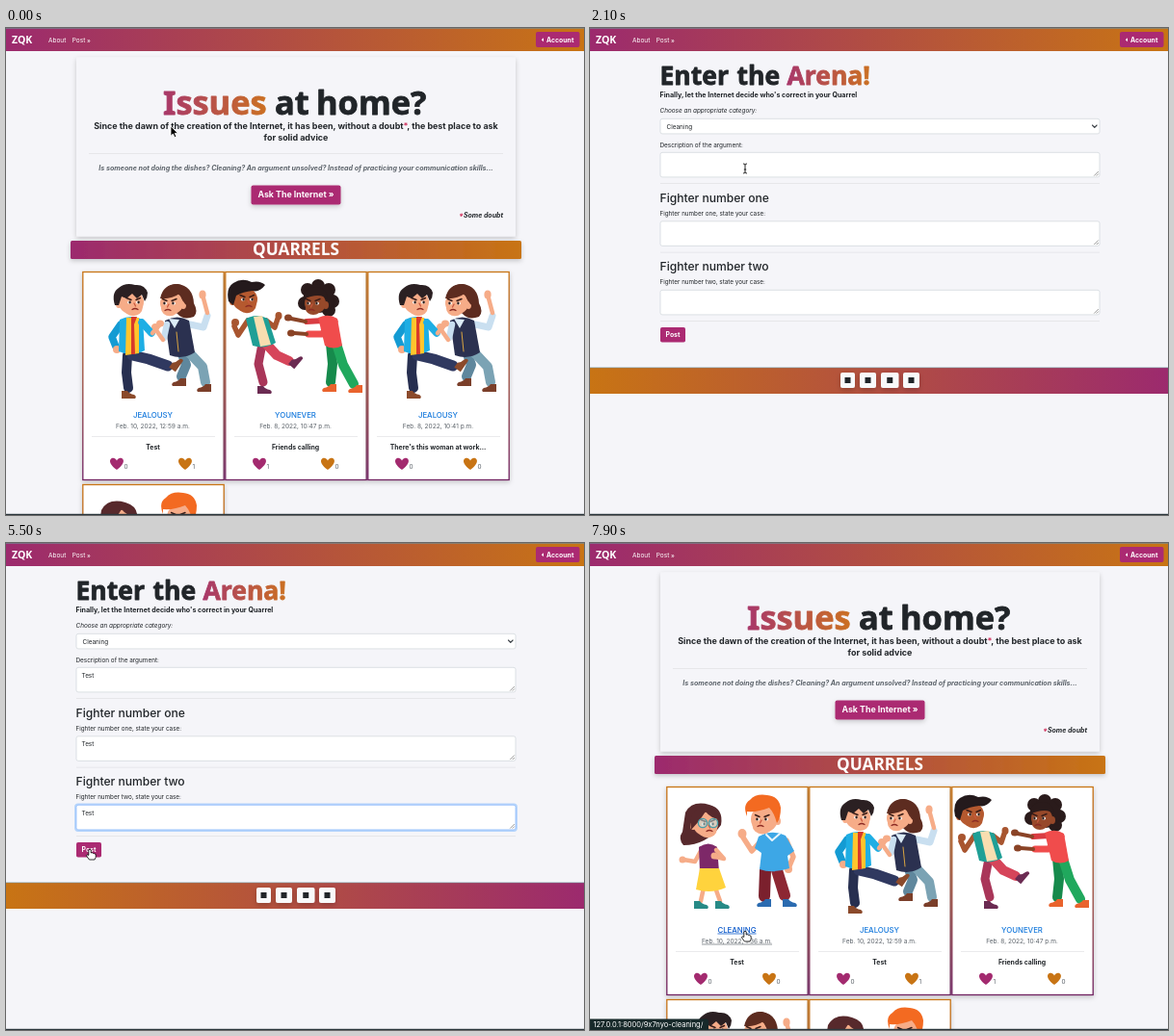
These frames come from a looping animation (600x506 px, 8 s). An HTML page:

```html
<!DOCTYPE html>
<html lang="en">
<head>
<meta charset="utf-8">
<title>Quarrels</title>
<style>
  html, body { margin: 0; width: 100%; height: 100%; overflow: hidden; background: #f5f5f9; }
  svg { display: block; width: 100vw; height: 100vh; font-family: Inter, sans-serif; fill: #212529; }
  text { white-space: pre; }
  .mid { text-anchor: middle; }
  .end { text-anchor: end; }
  .bold { font-weight: 700; }
  .medium { font-weight: 500; }
  .italic { font-style: italic; }
  .light { fill: #fff; }
  .muted { fill: #5c636a; }
  .blue { fill: #1478dc; }
  .display { font-family: "Noto Sans", sans-serif; font-weight: 700; stroke-linejoin: round; }
  .hover .card:first-child .link { text-decoration: underline; }
  .hover .card:first-child .blue { fill: #0a58ca; }
</style>
</head>
<body>
<svg id="stage" viewBox="0 0 600 506" preserveAspectRatio="none"></svg>
<script>
const PLUM = '#a32a6f', AMBER = '#c87414', INK = '#212529', SKIN = '#f6ac88';
const stage = document.getElementById('stage');

// Drawing helpers
const text = (x, y, size, str, cls = '', extra = '') =>
  `<text x="${x}" y="${y}" font-size="${size}" class="${cls}" ${extra}>${str}</text>`;
const rect = (x, y, w, h, fill, extra = '') =>
  `<rect x="${x}" y="${y}" width="${w}" height="${h}" fill="${fill}" ${extra}/>`;
const oval = (x, y, rx, ry, fill) => `<ellipse cx="${x}" cy="${y}" rx="${rx}" ry="${ry}" fill="${fill}"/>`;
const shape = (d, fill) => `<path d="M${d}Z" fill="${fill}"/>`;
const limb = (d, width, color) =>
  `<path d="M${d}" fill="none" stroke="${color}" stroke-width="${width}" stroke-linecap="round" stroke-linejoin="round"/>`;
const rule = (x1, x2, y) => rect(x1, y, x2 - x1, .6, '#dcdce0');
const title = (x, y, size, str, fill) =>
  text(x, y, size, str, 'display', `fill="${fill}" stroke="${fill}" stroke-width=".8"`);

const face = (x, y, skin, dir, r = 12) =>
  oval(x - dir * r, y + 2, 3, 4, skin) + oval(x, y, r, r * .95, skin) + oval(x + dir * 2, y + r * .45, r * .75, r * .65, skin) +
  [-4, 5].map(d => oval(x + dir * (d + 2), y, 2, 1.6, '#fff') + oval(x + dir * (d + 2.6), y, 1.2, 1.4, '#2b1a16')).join('') +
  limb(`${x - dir * 5} ${y - 4.5}l${dir * 5} 2M${x + dir * 5} ${y - 2.5}l${dir * 4.5} -2`, 1.4, '#3a1d18') +
  limb(`${x + dir * 3} ${y + 1}l${dir * 1.5} 3`, 1.2, '#c9583f') +
  limb(`${x + dir} ${y + 7.5}q${dir * 3} -2 ${dir * 6} 0`, 1.3, '#8c2b24');
const shoe = (x, y, color, dir = 1, tilt = 0) =>
  `<g transform="translate(${x} ${y}) rotate(${tilt}) scale(${dir} 1)">${shape('-6 -4h6q2 3 7 4q3 2 1 4h-14z', color)}</g>`;

// Each pair is drawn for the column whose left edge is `left`
const pairs = {
  jealousy: { left: 79, art:
    limb('182 336L187 350L182 362', 10, '#5f879d') + limb('189 336L204 352L207 368', 10, '#7ba3b4') +
    shoe(181, 368, '#7b3f2a', -1) + shoe(207, 374, '#7b3f2a', -1) +
    limb('191 308L205 311L209 299', 7, '#c9dff0') + limb('209 296L205 281', 4.5, SKIN) + oval(204, 277, 3.6, 4.5, SKIN) +
    shape('164 283Q162 266 178 266Q194 268 195 286Q200 295 195 300Q184 304 178 297', '#5d2c20') +
    face(172, 286, SKIN, -1) + shape('160 281Q163 266 178 266Q191 268 193 290Q185 290 180 276Q172 282 160 281', '#5d2c20') +
    shape('165 304Q178 297 190 304L196 337Q184 345 170 340', '#2b3150') + shape('169 302L180 303L175 312', '#dcecf7') +
    limb('167 308L164 322', 6.5, '#c9dff0') + limb('163 324L156 314', 4.5, SKIN) + oval(155, 311, 4, 4, SKIN) +
    limb('177 316l2 20', 1, '#d9a441') +
    limb('126 340L125 358L127 374', 10, '#272f50') + shoe(126, 381, '#8b4a2b') +
    limb('131 340L148 344L168 351', 11, '#303960') + shoe(176, 350, '#8b4a2b', 1, -55) +
    limb('119 308L110 321L114 331', 7.5, '#149bd3') + oval(115, 334, 4, 4, SKIN) +
    shape('118 303Q130 297 142 303L144 335Q130 342 117 336', '#1eaee4') + shape('125 301L138 301L138 338L124 340', '#ffc52d') +
    shape('130 300l6 0l-3 8l1 31h-4', '#d83a2c') +
    limb('141 306L151 317', 7.5, '#1eaee4') + limb('152 317L159 309', 4.5, SKIN) + oval(160, 307, 4, 3.5, SKIN) +
    face(130, 285, SKIN, 1, 13) +
    shape('113 288Q109 275 117 270Q124 264 134 267Q144 266 147 275Q147 280 144 284L141 277L136 281L131 276L125 281L120 279L117 288', '#2b2022') },

  younever: { left: 227, art:
    limb('266 328L262 349L267 368', 9, '#a93659') + shoe(267, 376, '#6b2b52') +
    limb('270 328L281 340L294 346', 10, '#d6455a') + shoe(300, 347, '#6b2b52', 1, -50) +
    limb('251 304L241 319L237 310', 5.5, '#a8552f') + oval(238, 306, 4, 4, '#a8552f') +
    limb('270 304L279 311L282 302', 5.5, '#a8552f') + oval(283, 299, 3.5, 4, '#a8552f') +
    shape('249 302Q260 296 272 302L280 327Q268 334 256 330', '#1f9f96') + shape('257 300L266 299L275 329L264 331', '#f8deb0') +
    face(248, 282, '#b5592f', 1, 13) +
    shape('231 284Q228 270 236 265Q245 259 255 264Q264 262 269 267Q263 275 256 273Q246 274 239 278L236 288', '#241a1c') +
    limb('337 328L339 349L337 368', 10, '#168a4c') + limb('343 328L350 350L361 370', 10, '#20a85d') +
    shoe(337, 374, '#e9632d', -1) + shoe(364, 375, '#e9632d', -1) +
    limb('329 304L312 305', 6, '#d93c42') + limb('311 305L296 302', 4, '#8a4326') + oval(293, 301, 4, 3.5, '#8a4326') +
    [[-14, 4], [-11, -10], [0, -14], [11, -10], [15, 2], [11, 11]].map(([x, y]) => oval(324 + x, 282 + y, 7, 7, '#2a1b1b')).join('') +
    oval(325, 281, 16, 15, '#2a1b1b') +
    shape('324 301Q335 296 344 302L349 330Q340 335 331 330', '#f04c4c') +
    limb('341 305L328 318L314 318', 7, '#f04c4c') + limb('312 318L299 317', 4, '#8a4326') + oval(296, 317, 4, 3.5, '#8a4326') +
    face(321, 286, '#97492a', -1, 11) + shape('308 282Q310 269 323 269Q334 271 334 282Q326 274 308 282', '#2a1b1b') },

  cleaning: { left: 79, art:
    shape('99 280Q106 267 124 272Q139 276 136 293Q121 314 97 314Q91 307 96 300', '#57292c') +
    limb('118 358L115 372', 4.5, SKIN) + limb('130 358L135 372', 4.5, SKIN) +
    shoe(114, 376, '#278a86', 1) + shoe(136, 376, '#278a86', 1) +
    limb('116 318L109 331L97 329', 4.5, SKIN) + oval(96, 329, 3.5, 3.5, SKIN) +
    shape('113 316Q123 309 132 316L134 342H114', '#7d2868') + shape('114 338H134L141 358Q126 365 110 360', '#ffd33d') +
    limb('131 319L139 328L130 326', 4.5, SKIN) + oval(129, 325, 3.5, 3.5, SKIN) +
    face(120, 292, SKIN, 1, 13) + shape('105 298Q101 276 119 275Q134 274 135 287Q125 286 120 279Q114 289 105 298', '#57292c') +
    [117, 128].map(x => `<circle cx="${x}" cy="291" r="4.6" fill="#bfe9ee" fill-opacity=".5" stroke="#4a9da8" stroke-width="1.4"/>`).join('') +
    limb('182 340L181 367', 12, '#7b202d') + limb('194 340L202 366', 12, '#8d2733') +
    shoe(182, 374, '#2b6bb0', -1) + shoe(206, 374, '#2b6bb0', 1) +
    limb('178 309L168 320L159 306', 5.5, SKIN) + oval(158, 302, 4.5, 5, SKIN) +
    limb('204 309L211 326L206 338', 5.5, SKIN) + oval(206, 339, 4, 4, SKIN) +
    shape('175 305Q189 297 203 304L212 320L205 325L207 338Q190 344 176 339L178 322L171 317', '#3da7e6') +
    limb('183 303L189 309L197 302', 2, '#e8f5fc') +
    face(181, 287, SKIN, -1, 14) +
    shape('163 284Q158 272 166 267Q172 260 184 262Q196 263 198 275Q198 286 194 291Q191 280 186 275Q174 280 163 279', '#f36a21') }
};

const heart = (x, y, fill) =>
  `<path transform="translate(${x} ${y})" d="M0 6C-14 -4 -3 -10 0 -3.5C3 -10 14 -4 0 6Z" fill="${fill}"/>`;

function card([kind, date, note, up, down], index) {
  const x = 79 + index % 3 * 148, y = 253 + Math.floor(index / 3) * 221, { left, art } = pairs[kind];
  const mid = x + 73.5;
  return `<g class="card">` +
    rect(x + .8, y + .5, 146.4, 216, '#fff', 'stroke="url(#edge)" stroke-width="1.3" filter="url(#shadow)"') +
    `<g transform="translate(${x - left} ${y - 253})">${art}</g>` +
    text(mid, y + 151.6, 7.8, kind.toUpperCase(), 'mid medium blue link') +
    text(mid, y + 162.7, 6.55, date, 'mid muted link') + rule(x + 10, x + 138, y + 171) +
    text(mid, y + 184.8, 6.9, note, 'mid bold') +
    heart(x + 36, y + 200, PLUM) + text(x + 43.5, y + 204.5, 6.4, up, 'muted') +
    heart(x + 107, y + 200, AMBER) + text(x + 114.5, y + 204.5, 6.4, down, 'muted') + '</g>';
}

const fresh = ['cleaning', 'Feb. 10, 2022, 1:36 a.m.', 'Test', 0, 0];
const older = [
  ['jealousy', 'Feb. 10, 2022, 12:59 a.m.', 'Test', 0, 1],
  ['younever', 'Feb. 8, 2022, 10:47 p.m.', 'Friends calling', 1, 0],
  ['jealousy', 'Feb. 8, 2022, 10:41 p.m.', "There's this woman at work...", 0, 0],
  ['cleaning', 'Feb. 8, 2022, 10:32 p.m.', 'Test', 0, 0]
];
const star = '<tspan fill="#d0305c">*</tspan>';

const home =
  rect(73, 30.5, 456, 186, '#f5f5f9', 'rx="1.5" filter="url(#shadow)"') +
  title(163, 89.5, 34.4, 'Issues', 'url(#warm)') + title(279, 89.5, 34.4, 'at', INK) + title(322, 89.5, 34.4, 'home?', INK) +
  text(301, 104.6, 8.94, `Since the dawn of the creation of the Internet, it has been, without a doubt${star}, the best place to ask`, 'mid bold') +
  text(301, 117, 8.94, 'for solid advice', 'mid bold') + rule(86, 516, 130) +
  text(301, 148.2, 7.08, 'Is someone not doing the dishes? Cleaning? An argument unsolved? Instead of practicing your communication skills...', 'mid bold italic muted') +
  rect(254.5, 163.5, 93, 20, '#ab2a72', 'rx="2" filter="url(#shadow)"') +
  text(301, 176.4, 8.8, 'Ask The Internet »', 'mid bold light') +
  text(516, 197.2, 7, star + 'Some doubt', 'end bold italic') +
  rect(67, 221, 468, 19, 'url(#bar)', 'rx="1.5" filter="url(#shadow)"') +
  text(301, 236.3, 17.2, 'QUARRELS', 'mid display light');

const fieldTops = [129.3, 200.8, 272.3];
const field = (y, i) =>
  `<rect id="ring${i}" x="72.2" y="${y - .8}" width="457.6" height="27.4" rx="2.6" fill="none" stroke="#b5d4fb" stroke-width="2.2"/>` +
  rect(73, y, 456, 25.6, '#fff', `id="box${i}" rx="2" stroke="#ced4da" stroke-width=".7"`) +
  limb(`523.5 ${y + 24}l4 -4M526 ${y + 24}l1.5 -1.5`, .6, '#555') +
  text(78.5, y + 10.4, 6.4, '', '', `id="value${i}"`) + rule(73, 529, y + 32);
const fighter = (word, y) =>
  text(72.5, y, 12.1, `Fighter number ${word}`, 'medium') +
  text(72.5, y + 13.8, 6.3, `Fighter number ${word}, state your case:`);
const social = [[260, 15], [280, 17], [302, 18.5], [325, 17]].map(([x, w]) =>
  rect(x, 358, w, 16, '#f8f9fa', 'rx="2" filter="url(#shadow)"') + rect(x + w / 2 - 3, 363, 6, 6, INK)).join('');

const form =
  title(72.5, 59, 26.5, 'Enter', INK) + title(152.5, 59, 26.5, 'the', INK) + title(204.5, 59, 26.5, 'Arena!', 'url(#warm)') +
  text(72.5, 71.6, 7.1, "Finally, let the Internet decide who's correct in your Quarrel", 'bold') +
  text(72.5, 88.3, 6.4, 'Choose an appropriate category:', 'italic') +
  rect(73, 94.3, 456, 15.6, '#fff', 'rx="2" stroke="#ced4da" stroke-width=".7"') +
  text(79.5, 104.6, 6.4, 'Cleaning') + limb('521.5 101l2.3 2.3l2.3 -2.3', 1.1, '#343a40') +
  text(72.5, 123.6, 6.4, 'Description of the argument:') +
  fighter('one', 181) + fighter('two', 252.3) + fieldTops.map(field).join('') +
  rect(0, 0, .7, 7.6, INK, 'id="caret"') +
  rect(73, 311, 26, 15.5, '#ab2a72', 'rx="1.8"') + text(86, 321.2, 6.9, 'Post', 'mid bold light') +
  rect(0, 353, 600, 27, 'url(#foot)') + rect(0, 352.6, 600, .6, '#6f8f98') + social;

const gradient = (id, from, to, extra = '') =>
  `<linearGradient id="${id}" ${extra}><stop stop-color="${from}"/><stop offset="1" stop-color="${to}"/></linearGradient>`;

stage.innerHTML = '<defs>' +
  gradient('bar', '#9c2a6e', AMBER) + gradient('foot', AMBER, '#9c2a6e') + gradient('warm', '#a8376a', '#cb7022') +
  gradient('edge', AMBER, '#6f2060', 'x2="0" y2="1"') +
  `<filter id="shadow" x="-50%" y="-50%" width="200%" height="220%"><feDropShadow dx="0" dy="2" stdDeviation="2.4" flood-opacity=".2"/></filter></defs>` +
  rect(0, 0, 600, 506, '#f5f5f9') +
  `<g id="home">${home}<g id="before">${older.map(card).join('')}</g>` +
  `<g id="after">${[fresh, ...older].map(card).join('')}</g></g>` +
  `<g id="form">${form}</g>` +
  rect(0, 0, 600, 24, 'url(#bar)') + rect(0, 0, 600, .6, '#6f8f98') +
  text(6, 16.3, 10.5, 'ZQK', 'display light') + text(44, 14.6, 6.5, 'About', 'light') + text(68.7, 14.6, 6.5, 'Post »', 'light') +
  rect(550, 4, 45.5, 16, '#ab2a72', 'rx="2"') + shape('558 10.3v4l-2.2 -2', '#fff') + text(561, 14.5, 6.9, 'Account', 'bold light') +
  rect(0, 504.8, 600, 1.2, '#2c373d') +
  `<g id="status">${shape('0 494.5H121Q123 494.5 123 497V506H0', '#17292a')}${text(3.5, 503, 7.5, '127.0.0.1:8000/9x7nyo-cleaning/', 'light')}</g>` +
  `<g id="pointer">
    <path id="arrow" d="M0 0V10.2L2.4 8L4 11.6L5.8 10.8L4.2 7.3H7.4Z" fill="#000" stroke="#fff" stroke-width=".8"/>
    <path id="hand" d="M-1.2 1Q0 -.8 1.2 1V4Q2.6 3.2 3.2 4.4Q4.6 3.8 5 5Q6.2 4.8 6.2 6V8.5L5 11H-.6L-3.6 6.8Q-3.6 5 -1.2 6.4Z" fill="#fff" stroke="#000" stroke-width=".8"/>
    <path id="beam" d="M-2 -5Q0 -5 0 -3.8Q0 -5 2 -5M0 -4V4M-2 5Q0 5 0 3.8Q0 5 2 5M-1.2 1H1.2" fill="none" stroke="#111" stroke-width=".9"/>
  </g>`;

// Timeline
const LOOP = 8000, STEP = 100;
const path = [[0, 171, 102], [300, 171, 102], [1000, 79, 10], [1300, 79, 10], [2000, 161, 146], [4700, 161, 146],
  [5500, 87, 318], [6200, 87, 318], [6800, 182, 325], [7000, 182, 325], [7700, 161, 403], [LOOP, 161, 403]];
const focusTimes = [2200, 3100, 3900, 5900], typeTimes = [2500, 3300, 4100];
const $ = id => document.getElementById(id);
const show = (id, on) => { $(id).style.display = on ? '' : 'none'; };
const within = (t, a, b) => t >= a && t < b;

function pointerAt(t) {
  const i = path.findIndex(p => p[0] > t);
  const [t0, x0, y0] = path[i - 1], [t1, x1, y1] = path[i];
  const u = (t - t0) / (t1 - t0), e = u * u * (3 - 2 * u);
  return [x0 + (x1 - x0) * e, y0 + (y1 - y0) * e];
}

function render(t) {
  const onForm = within(t, 1200, 5900);
  show('form', onForm);
  show('home', !onForm);
  show('before', t < 1200);
  show('after', t >= 5900);

  if (onForm) {
    show('caret', false);
    fieldTops.forEach((top, i) => {
      const focused = within(t, focusTimes[i], focusTimes[i + 1]);
      const typed = Math.max(0, Math.min(4, Math.floor((t - typeTimes[i]) / STEP) + 1));
      const value = $('value' + i);
      value.textContent = 'Test'.slice(0, typed);
      show('ring' + i, focused);
      $('box' + i).setAttribute('stroke', focused ? '#86b7fe' : '#ced4da');
      if (focused) {
        const x = 78.7 + (typed ? value.getComputedTextLength() : 0);
        $('caret').setAttribute('transform', `translate(${x} ${top + 4.2})`);
        show('caret', within(t, typeTimes[i], typeTimes[i] + 900) || (t - focusTimes[i]) % 1000 < 500);
      }
    });
  }

  const hand = within(t, 1000, 1300) || within(t, 5400, 6300) || t >= 7600;
  const beam = within(t, 1900, 4800);
  show('hand', hand);
  show('beam', beam);
  show('arrow', !hand && !beam);
  show('pointer', !within(t, 2500, 4700));
  $('pointer').setAttribute('transform', `translate(${pointerAt(t)})`);
  stage.classList.toggle('hover', t >= 7600);
  show('status', t >= 7700);
}

const start = performance.now();
function tick() {
  const t = (performance.now() - start) % LOOP;
  render(Math.floor(t / STEP) * STEP);
  requestAnimationFrame(tick);
}
tick();
</script>
</body>
</html>
```
